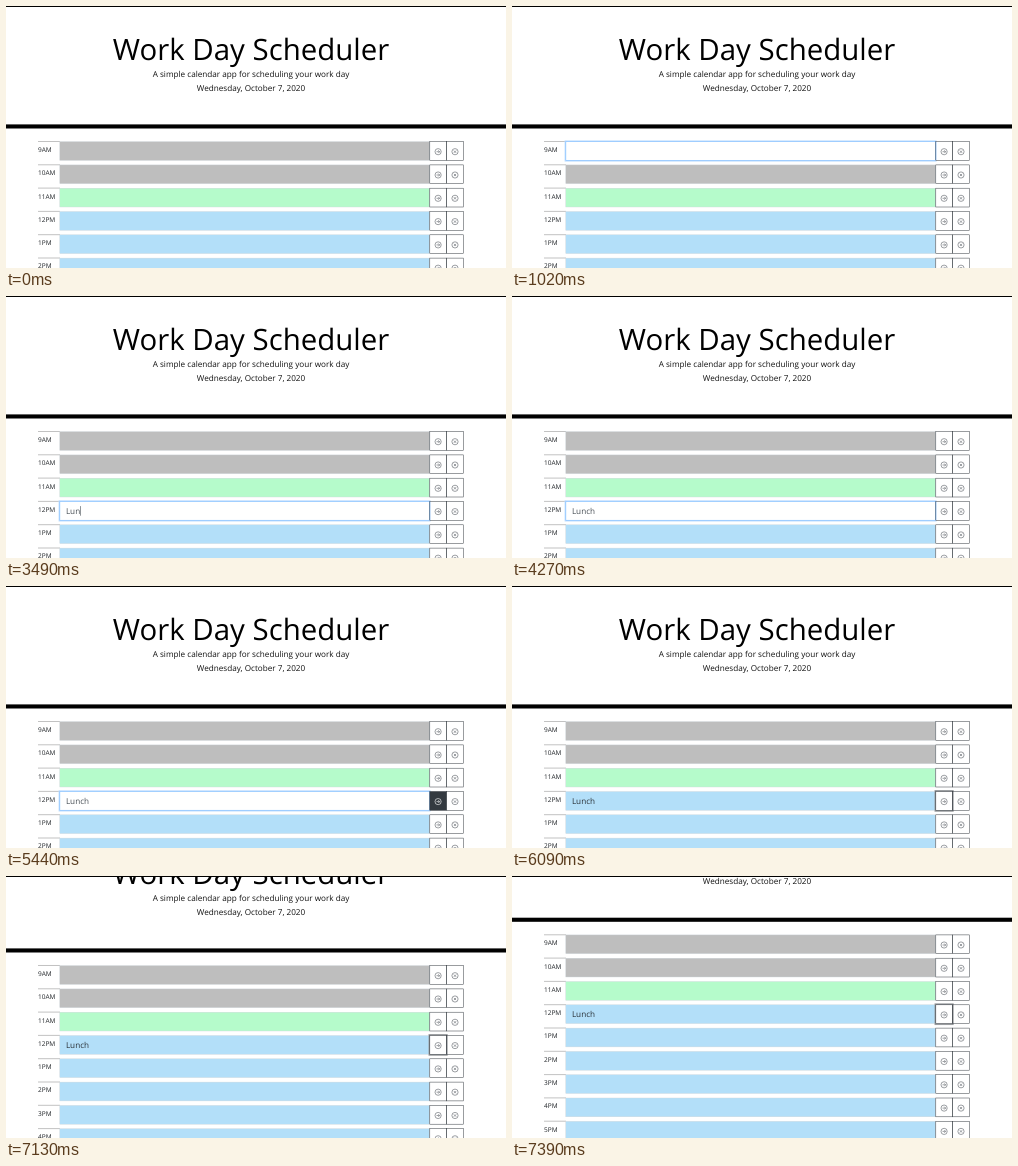
Recreate the animation shown at these times as an HTML page. Size 500 px wide and 262 px high, loop 7.78 s.

```html
<!DOCTYPE html>
<html lang="en">
<head>
<meta charset="utf-8">
<title>Work Day Scheduler</title>
<style>
  html, body { margin: 0; width: 100%; height: 100%; overflow: hidden; background: #fff; }
  svg { display: block; width: 100vw; height: 100vh; }
  text { font-family: "Open Sans", sans-serif; font-size: 8.16px; fill: #212529; text-rendering: geometricPrecision; }
  .head { text-anchor: middle; fill: #111; }
  .title { font-size: 29.4px; fill: #000; }
  .hour { font-size: 6.53px; }
  .icon { fill: none; stroke: #5b6167; stroke-width: .6; }
</style>
</head>
<body>
<svg id="stage" viewBox="0 0 500 262">
  <g id="page">
    <text class="head title" x="245" y="53.6">Work Day Scheduler</text>
    <text class="head" x="245" y="70.6">A simple calendar app for scheduling your work day</text>
    <text class="head" x="245" y="84.8">Wednesday, October 7, 2020</text>
    <rect y="118.4" width="500" height="4.1"/>
  </g>
  <rect width="500" height="1"/>
</svg>
<script>
const LOOP = 7780;
const ROW_TOP = 135.4, ROW_PITCH = 23.3, ROW_HEIGHT = 18.8;
const TEXT_X = 59.9;
const HOURS = ['9AM', '10AM', '11AM', '12PM', '1PM', '2PM', '3PM', '4PM', '5PM'];
const PAST = '#bebebe', PRESENT = '#b5fbcb', FUTURE = '#b3dff9';

// Each step changes only the listed properties; amounts run from 0 to 1.
const STEPS = [
  [0, { morning: 0, noon: 0, caret: 0, typed: '', hover: 0, ring: 0, scroll: 0 }],
  [500, { morning: 1, caret: 1 }],
  [1020, { caret: 0 }],
  [1540, { caret: 1 }],
  [2060, { caret: 0 }],
  [2320, { morning: .4, noon: .6, caret: 1 }],
  [2450, { morning: 0, noon: 1 }],
  [2840, { caret: 0 }],
  [3100, { typed: 'L', caret: 1 }],
  [3360, { typed: 'Lu' }],
  [3490, { typed: 'Lun' }],
  [3620, { typed: 'Lunc' }],
  [3750, { typed: 'Lunch' }],
  [4270, { caret: 0 }],
  [4790, { caret: 1 }],
  [5310, { caret: 0 }],
  [5440, { hover: 1 }],
  [5570, { noon: .4, ring: 1 }],
  [5700, { noon: 0 }],
  [5960, { hover: .4 }],
  [6090, { hover: 0 }],
  [7000, { scroll: 16 }],
  [7130, { scroll: 46 }],
  [7260, { scroll: 65 }],
  [7390, { scroll: 76.7 }],
];

const page = document.getElementById('page');

function add(parent, tag, attrs = {}, content = '') {
  const el = document.createElementNS('http://www.w3.org/2000/svg', tag);
  for (const name in attrs) el.setAttribute(name, attrs[name]);
  el.textContent = content;
  parent.append(el);
  return el;
}

function addButton(row, x, glyph) {
  const ring = add(row, 'rect', { x: x - .5, y: -.5, width: 17.6, height: ROW_HEIGHT + 1.4,
    fill: 'none', stroke: '#999c9f', 'stroke-width': 1.5, opacity: 0 });
  const box = add(row, 'rect', { x, y: .2, width: 16.6, height: ROW_HEIGHT,
    fill: '#343a40', 'fill-opacity': 0, stroke: '#343a40', 'stroke-width': .5 });
  const icon = add(row, 'g', { class: 'icon', transform: `translate(${x + 8.3} 10.3)` });
  add(icon, 'circle', { r: 3.1 });
  add(icon, 'path', { d: glyph });
  return { ring, box, icon };
}

function addRow(hour, i) {
  const row = add(page, 'g', { transform: `translate(0 ${ROW_TOP + i * ROW_PITCH})` });
  const fill = i < 2 ? PAST : i === 2 ? PRESENT : FUTURE;
  add(row, 'path', { d: 'M32 .1H54', stroke: '#999', 'stroke-width': .6 });
  add(row, 'text', { class: 'hour', x: 32, y: 10.6 }, hour);
  add(row, 'rect', { x: 53.8, y: .2, width: 369.6, height: ROW_HEIGHT, fill,
    stroke: '#ced4da', 'stroke-width': .4 });
  const focus = add(row, 'g', { opacity: 0 });
  add(focus, 'rect', { x: 53.4, y: -.2, width: 370.4, height: ROW_HEIGHT + .8,
    fill: '#fff', stroke: '#bfdeff', 'stroke-width': 1.6 });
  add(focus, 'rect', { x: 53.8, y: .2, width: 369.6, height: ROW_HEIGHT,
    fill: 'none', stroke: '#80bdff', 'stroke-width': .5 });
  const text = add(row, 'text', { x: TEXT_X, y: 12.7 });
  const caret = add(row, 'rect', { y: 4.8, width: .6, height: 9.6, fill: '#495057', opacity: 0 });
  const save = addButton(row, 423.8, 'M-1.6 0H1.5M.2 -1.4L1.6 0L.2 1.4');
  addButton(row, 440.7, 'M-1.2 -1.2L1.2 1.2M1.2 -1.2L-1.2 1.2');
  return { focus, text, caret, save };
}

const rows = HOURS.map(addRow);
const [morning, noon] = [rows[0], rows[3]];

function setField(row, amount, typed, caretOn) {
  row.focus.setAttribute('opacity', amount);
  row.text.textContent = typed;
  row.text.style.fill = amount > .5 ? '#495057' : '#2b3238';
  const end = typed ? row.text.getComputedTextLength() : 0;
  row.caret.setAttribute('x', TEXT_X + end);
  row.caret.setAttribute('opacity', amount > .5 && caretOn ? 1 : 0);
}

function render(time) {
  const s = Object.assign({}, ...STEPS.filter(([at]) => at <= time).map(([, change]) => change));
  setField(morning, s.morning, '', s.caret);
  setField(noon, s.noon, s.typed, s.caret);
  noon.save.ring.setAttribute('opacity', s.ring);
  noon.save.box.setAttribute('fill-opacity', s.hover);
  noon.save.icon.style.stroke = s.hover > .5 ? '#fff' : '';
  page.setAttribute('transform', `translate(0 ${-s.scroll})`);
}

const start = performance.now();
function tick() {
  render((performance.now() - start) % LOOP);
  requestAnimationFrame(tick);
}
tick();
</script>
</body>
</html>
```
